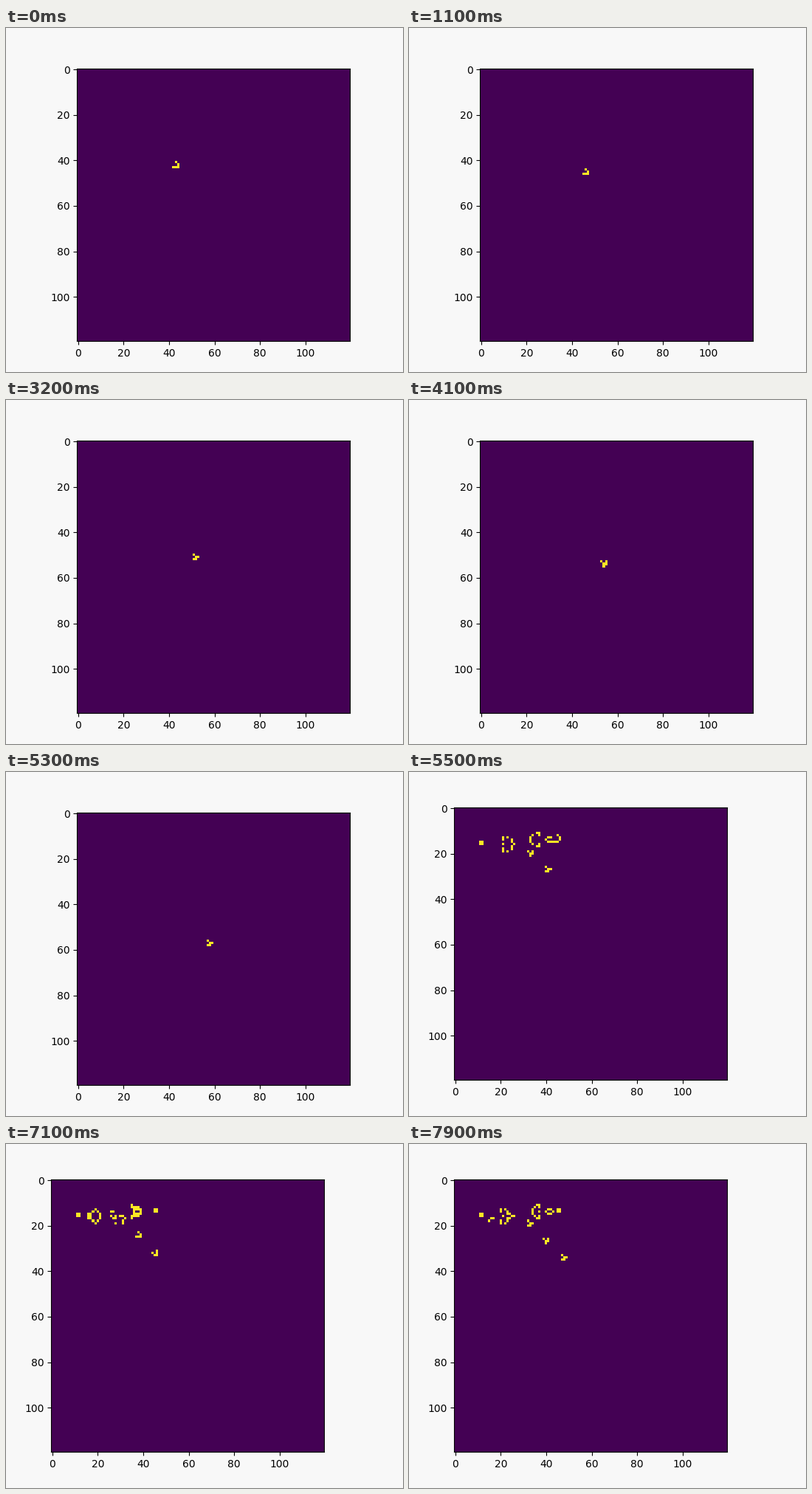
Write a matplotlib script that moves like this. It is 538 px wide and 466 px high and loops after 8000 ms.

```python
import numpy as np
import matplotlib.pyplot as plt
from matplotlib.animation import FuncAnimation

W, H, DPI = 538, 466, 100
N = 120
SIDE = 369.6
FRAMES, INTERVAL = 80, 100
SWITCH = 55  # frame where the gun takes over from the glider

GLIDER = """
.O.
..O
OOO
"""

GUN = """
........................O...........
......................O.O...........
............OO......OO............OO
...........O...O....OO............OO
OO........O.....O...OO..............
OO........O...O.OO....O.O...........
..........O.....O.......O...........
...........O...O....................
............OO......................
"""


def place(pattern, row, col):
    grid = np.zeros((N, N), dtype=int)
    for r, line in enumerate(pattern.split()):
        for c, ch in enumerate(line):
            grid[row + r, col + c] = ch == "O"
    return grid


def step(grid):
    near = sum(
        np.roll(grid, (dr, dc), (0, 1))
        for dr in (-1, 0, 1)
        for dc in (-1, 0, 1)
        if dr or dc
    )
    return ((near == 3) | ((grid == 1) & (near == 2))).astype(int)


def evolve(grid, count):
    history = [grid]
    for _ in range(count):
        history.append(step(history[-1]))
    return history


def box(left, top):
    """Axes rectangle in figure fractions from its top left pixel."""
    return [left / W, (H - top - SIDE) / H, SIDE / W, SIDE / H]


glider = evolve(place(GLIDER, 41, 42), 64)
gun = evolve(place(GUN, 11, 11), 90)

fig = plt.figure(figsize=(W / DPI, H / DPI), dpi=DPI, facecolor="#f8f8f8")
ax = fig.add_axes(box(96.2, 54.6))
img = ax.imshow(glider[0], cmap="viridis", vmin=0, vmax=1, interpolation="nearest")


def update(i):
    # the simulation runs slightly faster than the frame rate
    if i < SWITCH:
        ax.set_position(box(96.2, 54.6))
        img.set_data(glider[int(i * 10 / 9 + 0.15)])
    else:
        ax.set_position(box(61.2, 47.6))
        img.set_data(gun[54 + int((i - SWITCH) * 7 / 6 + 0.5)])
    return [img]


anim = FuncAnimation(fig, update, frames=FRAMES, interval=INTERVAL,
                     repeat=True, repeat_delay=0, blit=False)
plt.show()
```
